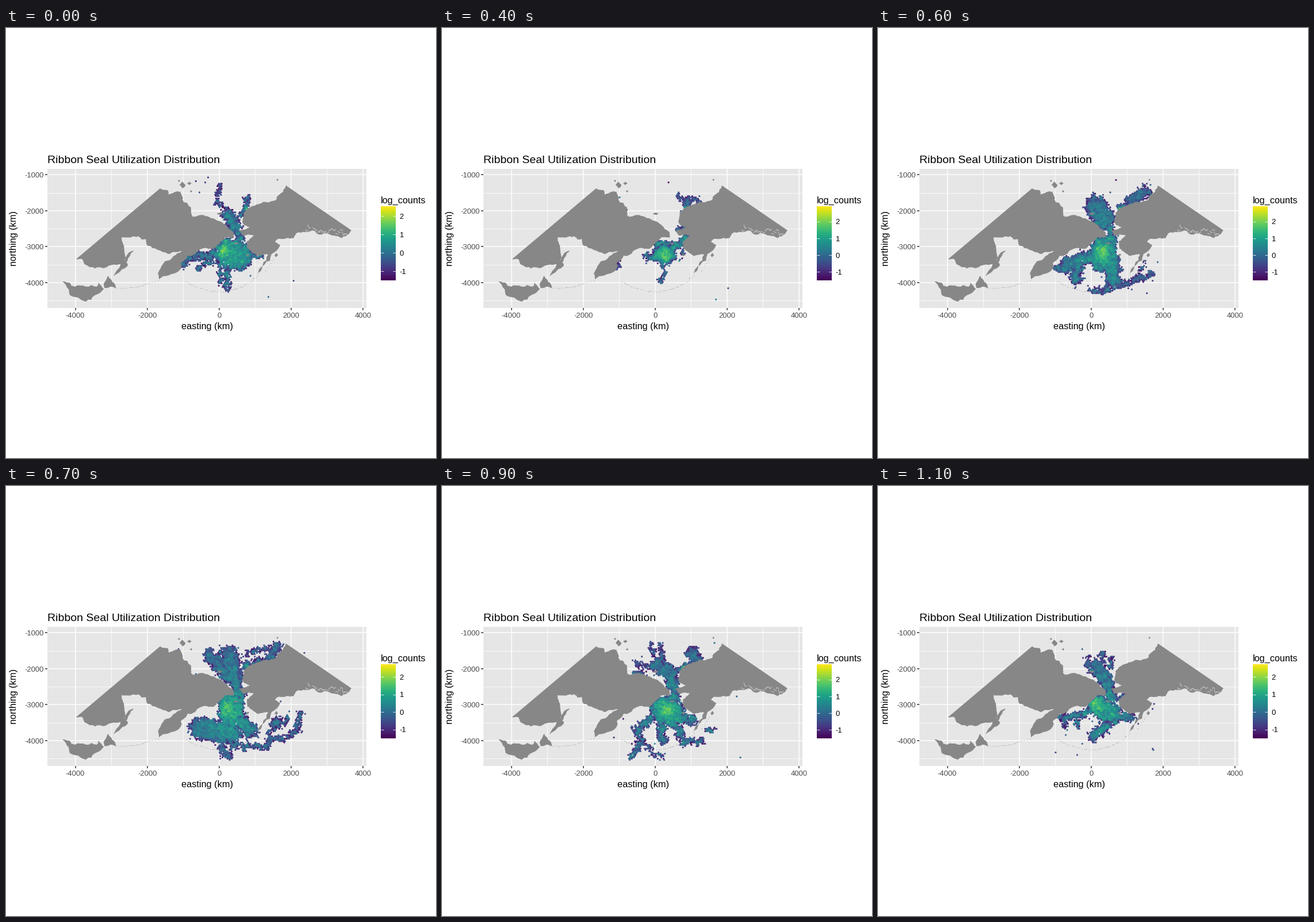
Write a matplotlib script that moves like this. It is 748 by 748 pixels and loops after 1.2 s.

```python
import numpy as np
import matplotlib.pyplot as plt
from matplotlib.animation import FuncAnimation
from matplotlib.collections import PolyCollection
from matplotlib.patches import Polygon, Rectangle

SIZE, DPI = 748, 100
SCALE = 0.06256                      # pixels per km
X0, Y0 = 370.8, 192.7                # pixel position of 0, 0
L, R, T, B = 72.3, 627.5, 244.8, 487.2
BAR_L, BAR_R, BAR_T, BAR_B = 652.3, 678.3, 310.5, 439
GREY, LAND = "#e6e6e6", "#878787"
HEX = 2.5                            # hexagon width in pixels
plt.rcParams["font.family"] = "Liberation Sans"

fig = plt.figure(figsize=(SIZE / DPI, SIZE / DPI), dpi=DPI, facecolor="white")
ax = fig.add_axes([0, 0, 1, 1])
ax.axis("off")


def px(km):
    return X0 + km * SCALE


def py(km):
    return Y0 - km * SCALE


def label(x, y, s, size, color="black", **kw):
    return ax.text(x, y, s, fontsize=size * 72 / DPI, color=color, **kw)


def line(xs, ys, color, width, z):
    return ax.plot(xs, ys, color=color, lw=width * 72 / DPI, zorder=z,
                   solid_capstyle="butt")[0]


# ---- panel, grid and axes
ax.add_patch(Rectangle((L, T), R - L, B - T, fc=GREY, lw=0, zorder=0))
for km in range(-4000, 4001, 1000):
    major = km % 2000 == 0
    line([px(km)] * 2, [T, B], "white", 1.5 if major else 0.8, 1)
    if major:
        line([px(km)] * 2, [B, B + 4], "#333333", 1.5, 1)
        label(px(km), 504, str(km), 13, "#4d4d4d", ha="center")
for km in range(-4500, -999, 500):
    major = km % 1000 == 0
    line([L, R], [py(km)] * 2, "white", 1.5 if major else 0.8, 1)
    if major:
        line([L - 4, L], [py(km)] * 2, "#333333", 1.5, 1)
        label(66, py(km) + 4.7, str(km), 13, "#4d4d4d", ha="right")
label(72, 235, "Ribbon Seal Utilization Distribution", 19.5)
label(349.8, 524, "easting (km)", 16.2, ha="center")
label(14, 366, "northing (km)", 16.2, rotation=90, ha="center", va="center")
label(652, 304.5, "log_counts", 16.2)

# ---- land
rng = np.random.default_rng(7)


def roughen(p, levels=3, amount=0.1):
    """Midpoint displacement; long borders stay straight."""
    for _ in range(levels):
        d = np.roll(p, -1, 0) - p
        k = rng.normal(0, amount, len(p)) * (np.hypot(*d.T) < 30)
        mid = p + d / 2 + np.c_[-d[:, 1], d[:, 0]] * k[:, None]
        p = np.stack([p, mid], 1).reshape(-1, 2)
    return p


def land(*flat):
    p = roughen(np.reshape(flat, (-1, 2)).astype(float))
    ax.add_patch(Polygon(p, fc=LAND, lw=0, zorder=4))


def island(x, y, w, h):
    land(x - w, y, x, y - h, x + w, y, x, y + h)


def islets(n, start, bend, end):
    """Scatter specks along a quadratic curve."""
    for t in np.linspace(0, 1, n):
        x, y = ((1 - t) ** 2 * np.array(start) + 2 * t * (1 - t) * np.array(bend)
                + t * t * np.array(end) + rng.normal(0, 0.5, 2))
        island(x, y, rng.uniform(0.5, 1.7), 0.5)


# Asia: Arctic coast, Bering coast, Sea of Okhotsk
land(122, 402, 268, 279, 282, 283, 283, 290, 303, 285, 309, 303, 322, 313,
     322, 326, 335, 326, 360, 331, 384, 345, 396, 355,
     397, 364, 381, 364, 372, 373, 361, 384, 338, 385, 316, 396, 304, 410,
     299, 424, 266, 437,
     269, 418, 276, 406, 306, 388, 282, 393, 246, 379, 243, 367, 230, 362,
     201, 364, 206, 388, 208, 400, 197, 411, 160, 416, 138, 412, 134, 404)
# Alaska
land(487, 274, 601, 352, 597, 358, 570, 361, 537, 353, 505, 357, 490, 365,
     474, 367, 468, 372, 477, 377, 462, 393, 437, 431, 456, 394, 437, 396,
     420, 384, 419, 371, 431, 361, 412, 361, 405, 353, 424, 347, 411, 337,
     413, 322, 436, 307, 470, 299, 481, 286)
# Sakhalin, Hokkaido, Honshu
land(222, 387, 209, 408, 212, 413, 187, 432, 205, 405)
land(178, 431, 191, 452, 171, 452)
land(98, 441, 120, 450, 158, 450, 161, 443, 170, 454, 139, 476, 120, 468)
for spec in [(372, 323, 5, 2), (307, 273, 5, 6), (319, 270, 4, 3),
             (301, 266, 2, 2), (322, 284, 2, 2), (472, 264, 2, 2),
             (401, 375, 6, 2), (420, 395, 3, 2), (470, 395, 3, 4)]:
    island(*spec)
islets(34, (438, 431), (385, 480), (313, 442))
islets(18, (192, 452), (225, 456), (264, 438))
islets(6, (452, 422), (460, 411), (466, 402))

# fjords along the south-eastern coast
for x in range(521, 590, 4):
    y = 346 + (x - 521) * 0.08 + rng.uniform(0, 8)
    line(x + np.array([0, 2, 5]), y + rng.normal(0, 1.5, 3), GREY, 0.7, 5)

# ---- hexagon lattice
rows = np.arange(260, 482, HEX * np.sqrt(3) / 2)
cells = np.array([(x + HEX / 2 * (i % 2), y) for i, y in enumerate(rows)
                  for x in np.arange(294, 522, HEX)])
turn = np.radians(np.arange(30, 390, 60))
hexes = cells[:, None] + HEX / np.sqrt(3) * np.c_[np.cos(turn), np.sin(turn)]


def bump(x, y, r):
    return np.exp(-((cells - (x, y)) ** 2).sum(1) / (2 * r * r))


def path_distance(p):
    a, d = p[:-1], np.diff(p, axis=0)
    rel = cells[:, None] - a
    t = np.clip((rel * d).sum(2) / (d * d).sum(1), 0, 1)
    return np.linalg.norm(rel - t[..., None] * d, axis=2).min(1)


def month(seed, top, core, strokes):
    """Legend top, depth inside the used area and relative count per cell.

    A stroke is x, y to x, y with a half width; thin ones wander.
    """
    r = np.random.default_rng(seed)
    depth = np.full(len(cells), -9.0)
    steps = np.linspace(0, 1, 9)[:, None]
    for x0, y0, x1, y1, w in strokes:
        a, b = np.array([x0, y0]), np.array([x1, y1])
        walk = np.cumsum(r.normal(0, 1, (9, 2)), 0)
        walk -= walk[0] + steps * (walk[-1] - walk[0])
        sway = 0.06 * np.hypot(*(b - a)) if w < 8 else 0.4
        path = a + steps * (b - a) + sway * walk
        depth = np.maximum(depth, w - path_distance(path))

    angle = r.uniform(0, 2 * np.pi, 24)
    k = 2 * np.pi / r.uniform(7, 22, 24) * [np.cos(angle), np.sin(angle)]
    wave = np.sin(cells @ k + r.uniform(0, 2 * np.pi, 24)).sum(1) / np.sqrt(12)
    depth += 1.5 * wave + 0.9 * r.standard_t(3, len(cells))

    heat = 0.35 + 0.19 * bump(392, 392, 42)
    heat *= 1 - np.exp(-np.maximum(depth + 0.5, 0) / 3)
    heat += 0.2 * bump(*core, 9) + 0.35 * bump(420, 315, 3.5)
    return top, depth, heat + 0.03 * wave + r.normal(0, 0.05, len(cells))


KEYS = {
    0: month(1, 2.52, (377, 386), [
        (388, 392, 404, 396, 26), (365, 392, 306, 412, 7), (360, 406, 334, 418, 4),
        (382, 420, 385, 452, 6), (372, 412, 373, 442, 3), (386, 324, 398, 345, 12),
        (398, 345, 410, 366, 7), (372, 272, 366, 303, 3.5), (366, 300, 378, 318, 3),
        (408, 325, 422, 296, 4.5), (428, 394, 445, 395, 3)]),
    2: month(2, 2.29, (394, 404), [
        (388, 394, 404, 396, 23), (365, 390, 348, 396, 11), (340, 396, 306, 412, 7),
        (336, 402, 337, 415, 5), (380, 283, 384, 300, 3), (384, 300, 408, 300, 3),
        (405, 300, 411, 288, 3), (384, 327, 410, 328, 5), (435, 306, 440, 294, 4.5),
        (418, 317, 435, 308, 3), (402, 330, 388, 350, 3), (405, 330, 424, 349, 3),
        (380, 364, 424, 364, 3), (380, 418, 386, 430, 3)]),
    4: month(3, 2.9, (386, 397), [
        (384, 393, 390, 394, 18), (368, 395, 356, 399, 6), (372, 378, 400, 376, 5),
        (402, 382, 428, 366, 8), (418, 385, 417, 400, 3), (384, 412, 386, 430, 3),
        (387, 430, 381, 442, 3), (307, 406, 301, 418, 3.5), (428, 300, 426, 314, 8),
        (412, 291, 445, 303, 4), (410, 350, 421, 347, 3)]),
    6: month(4, 2.9, (390, 390), [
        (380, 312, 392, 332, 20), (375, 292, 376, 300, 4), (402, 340, 408, 372, 8),
        (393, 384, 390, 402, 23), (405, 405, 410, 440, 15), (360, 402, 322, 416, 13),
        (345, 425, 345, 437, 11), (372, 458, 418, 447, 5), (420, 448, 476, 428, 5),
        (455, 432, 463, 410, 3), (420, 314, 440, 305, 6), (440, 303, 464, 285, 11)]),
    7: month(5, 2.7, (382, 388), [
        (355, 295, 385, 330, 12), (388, 294, 395, 330, 17), (395, 335, 408, 364, 10),
        (392, 375, 392, 400, 23), (400, 405, 425, 425, 14), (338, 422, 390, 430, 20),
        (375, 455, 387, 468, 7), (416, 313, 445, 304, 6), (460, 297, 472, 277, 9),
        (418, 292, 455, 282, 4), (395, 452, 455, 450, 5), (455, 450, 490, 438, 5),
        (490, 438, 512, 396, 5), (468, 411, 476, 411, 9), (456, 430, 490, 404, 3.5)]),
    9: month(6, 2.9, (392, 390), [
        (372, 310, 396, 325, 12), (398, 322, 402, 348, 12), (414, 320, 424, 314, 6),
        (436, 292, 440, 300, 13), (334, 325, 352, 326, 4), (340, 308, 365, 312, 4.5),
        (364, 276, 372, 300, 3.5), (382, 276, 386, 305, 4), (400, 345, 408, 370, 8),
        (385, 388, 400, 396, 24), (410, 400, 436, 408, 9), (382, 415, 384, 442, 8),
        (362, 405, 340, 425, 8), (340, 425, 348, 447, 5.5), (345, 445, 330, 470, 6),
        (408, 415, 420, 445, 7), (420, 448, 452, 445, 5), (462, 424, 473, 423, 5),
        (348, 448, 382, 470, 3.5)]),
    11: month(7, 2.7, (377, 378), [
        (380, 314, 395, 335, 14), (390, 290, 392, 305, 5), (366, 302, 370, 320, 5),
        (406, 300, 404, 315, 4), (400, 345, 406, 370, 10), (384, 383, 405, 396, 20),
        (360, 395, 318, 403, 7), (345, 405, 350, 420, 4), (325, 405, 326, 418, 4),
        (412, 402, 440, 402, 8), (375, 435, 395, 420, 10), (412, 368, 428, 364, 4)]),
}


def month_at(i):
    """Months between two known ones are their mean."""
    if i in KEYS:
        return KEYS[i]
    (ta, da, ha), (tb, db, hb) = KEYS[i - 1], KEYS[i + 1]
    return (ta + tb) / 2, (da + db) / 2 + 1.5, (ha + hb) / 2


# ---- legend and animated layer
cmap = plt.get_cmap("viridis")
ax.imshow(np.linspace(1, 0, 256)[:, None], cmap=cmap, aspect="auto", zorder=2,
          extent=(BAR_L, BAR_R, BAR_B, BAR_T), interpolation="bilinear")
tick = (BAR_R - BAR_L) / 5
marks = [(v, line([BAR_L, BAR_L + tick], [0, 0], "white", 0.8, 3),
          line([BAR_R - tick, BAR_R], [0, 0], "white", 0.8, 3),
          label(684.5, 0, str(v), 13)) for v in (-1, 0, 1, 2)]
bins = PolyCollection([], linewidths=0.3, zorder=3)
ax.add_collection(bins)
ax.set_xlim(0, SIZE)
ax.set_ylim(SIZE, 0)


def draw(i):
    top, depth, heat = month_at(i)
    used = depth > 0
    bins.set_verts(hexes[used])
    bins.set_color(cmap(np.clip(heat[used], 0, 1)))
    for v, left, right, text in marks:
        y = BAR_B - (v + 1.5) / (top + 1.5) * (BAR_B - BAR_T)
        left.set_ydata([y, y])
        right.set_ydata([y, y])
        text.set_y(y + 4.7)
    return [bins]


anim = FuncAnimation(fig, draw, frames=12, interval=100, repeat=True,
                     repeat_delay=0, blit=False)
plt.show()
```
